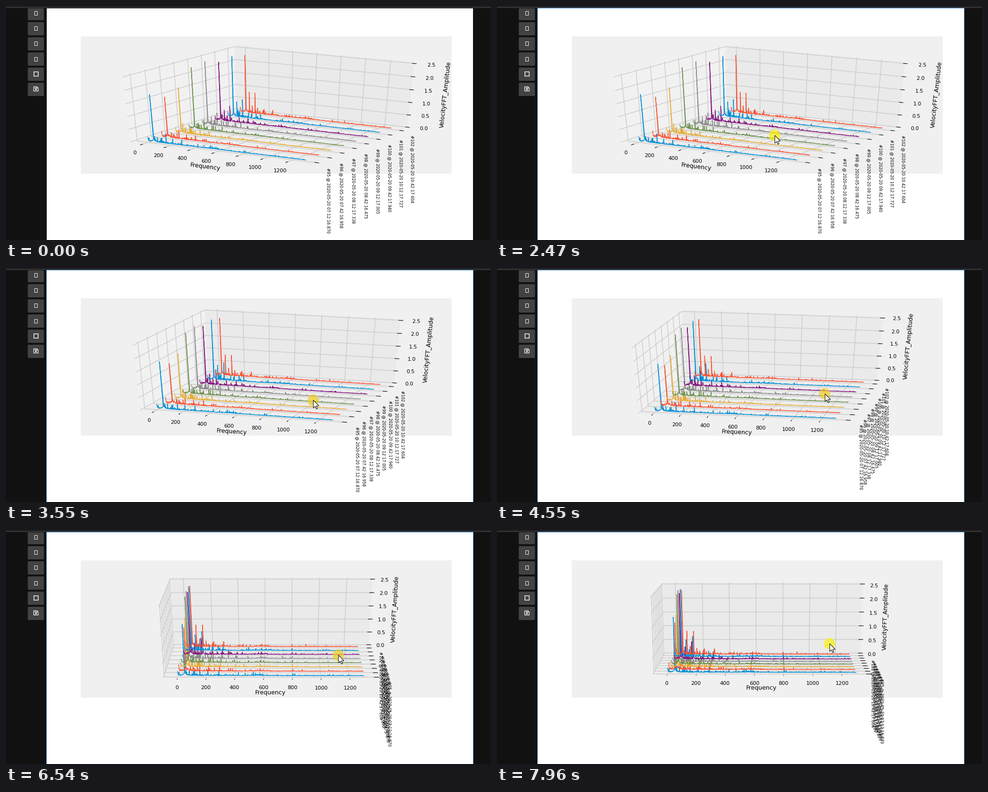
Recreate the animation shown at these times as a matplotlib script. Size 1024 by 494 pixels, loop 8000 ms.

```python
import numpy as np
import matplotlib.pyplot as plt
from matplotlib.animation import FuncAnimation
from matplotlib.collections import LineCollection
from matplotlib.patches import Circle, FancyBboxPatch, Polygon, Rectangle

W, H, DPI = 1024, 494, 100
LOOP, STEP = 8000, 40

plt.rcParams["font.family"] = "DejaVu Sans"
fig = plt.figure(figsize=(W / DPI, H / DPI), dpi=DPI, facecolor="#111111")
ax = fig.add_axes([0, 0, 1, 1])
ax.set(xlim=(0, W), ylim=(H, 0))
ax.axis("off")


def pt(pixels):
    return pixels * 72 / DPI


def box(x0, y0, x1, y1, color, z=0.0):
    return ax.add_patch(Rectangle((x0, y0), x1 - x0, y1 - y0, fc=color, lw=0, zorder=z))


def outline(x0, y0, x1, y1, lw):
    ax.add_patch(Rectangle((x0, y0), x1 - x0, y1 - y0, fill=False, ec="#f4f4f4", lw=pt(lw), zorder=0.3))


# ---- page and toolbar ----
box(0, 0, W, 3, "#222222")
box(0, 3, W, 4, "#4a4a4a")
focus = box(85, 4, 987, H, "#3b8fd8")
box(86, 5, 986, H, "#ffffff", 0.05)
box(158, 64, 941, 354, "#f0f0f0", 0.1)

for k in range(6):
    top = 2 + 32 * k
    cut = 3 if k == 0 else 0
    ax.add_patch(FancyBboxPatch((48, top + 2 + cut), 30, 24 - cut, fc="#424242", lw=0,
                                boxstyle="round,pad=2,rounding_size=2", zorder=0.2))
    if k < 4:
        outline(59.5, top + 9.5, 65.5, top + 17.5, 1)
outline(58.5, 138.5, 68, 147.5, 1.5)
ax.add_patch(Polygon([(58.5, 170.5), (65.5, 170.5), (68, 173), (68, 179.5), (58.5, 179.5)],
                     fill=False, ec="#f4f4f4", lw=pt(1.3), zorder=0.3))
outline(60.5, 171.5, 64.5, 173.5, 1)
ax.add_patch(Circle((63.2, 176.6), 1.6, fc="#f4f4f4", lw=0, zorder=0.3))

# ---- spectra ----
PALETTE = ["#008fd5", "#fc4f30", "#e5ae38", "#6d904f", "#8b8b8b", "#810f7c"]
SECONDS = [16.870, 16.958, 17.338, 16.475, 17.005, 17.940, 17.727, 17.604]
MAIN_PEAK = [1.84, 1.59, 1.79, 2.40, 2.48, 2.32, 2.40, 2.30]
COUNT = len(SECONDS)
freq = np.arange(0, 1301, 2.0)


def label(k):
    hour, minute = divmod(7 * 60 + 12 + 30 * k, 60)
    return f"#{95 + k} @ 2020-05-20 {hour:02}:{minute:02}:{SECONDS[k]:.3f}"


def spectrum(k):
    rng = np.random.default_rng(40 + k)
    amp = rng.exponential(0.006 + 0.014 * np.exp(-freq / 300))
    amp += 0.13 * np.exp(-freq / 3) + 0.10 / (1 + ((freq - 50) / 9) ** 2)
    amp += rng.exponential(0.015, freq.size) * np.exp(-((freq - 580) / 70) ** 2)
    for f in 60 + rng.exponential(200, 34):
        if f < 1290:
            amp[int(f / 2)] += rng.exponential(0.07) * np.exp(-f / 600) + 0.02
    # harmonics grow from the first spectrum to the last
    s = k / (COUNT - 1)
    peaks = {50: MAIN_PEAK[k], 82: 0.2 + 0.65 * s ** 3, 107: 0.06 + 0.24 * s,
             133: 0.08 + 0.76 * s, 212: 0.2, 288: 0.2, 575: 0.1, 805: 0.08, 1060: 0.05}
    for f, a in peaks.items():
        amp[f // 2] = a
    return amp


# ---- 3D projection in unit-cube coordinates ----
def unit_x(f):
    return (np.asarray(f) + 65) / 1430


def unit_y(n):
    return (np.asarray(n) + 0.35) / 7.7


def project(p, az, el):
    a, e = np.radians([az, el])
    d = np.asarray(p, float) - 0.5
    u = np.array([-np.sin(a), np.cos(a), 0])
    v = np.array([-np.sin(e) * np.cos(a), -np.sin(e) * np.sin(a), np.cos(e)])
    depth = 10 - d @ np.cross(u, v)
    return np.stack([560.1 + 783 / 0.185 * (d @ u) / depth,
                     205.1 - 290 / 0.185 * (d @ v) / depth], axis=-1)


curves = []
for k in range(COUNT):
    pts = np.column_stack([unit_x(freq), np.full(freq.size, unit_y(k)), spectrum(k) / 2.5])
    line, = ax.plot([], [], color=PALETTE[k % len(PALETTE)], lw=1, zorder=2 + k * 0.01)
    curves.append((line, pts))

LO, HI = -1 / 48, 1 + 1 / 48
CORNER = np.array([LO, HI, LO])  # where the three panes meet
PAD_TICK, PAD_TITLE = 0.0595, 0.1294

panes = []
for i, shade in enumerate([0.95, 0.9, 0.925]):
    j, m = [q for q in range(3) if q != i]
    quad = np.full((4, 3), CORNER[i])
    quad[:, j] = [LO, HI, HI, LO]
    quad[:, m] = [LO, LO, HI, HI]
    patch = ax.add_patch(Polygon(np.zeros((4, 2)), fc=(shade,) * 3, alpha=0.5, lw=0, zorder=0.5))
    panes.append((patch, quad))


class Axis3:
    """One axis: edge line, grid, ticks, tick labels and title."""

    def __init__(self, i, edge, tick_dir, locs, names, title="", size=8, rot=0):
        z = 1 + i * 0.1
        self.ends = np.array([edge, edge], float)
        self.ends[:, i] = LO, HI
        self.edge, = ax.plot([], [], color="#f0f0f0", lw=3, zorder=z)
        self.grid = ax.add_collection(LineCollection([], colors="#cbcbcb", lw=1, zorder=z + 0.02))
        self.ticks = ax.add_collection(LineCollection([], colors="k", lw=0.8, zorder=z + 0.04))

        base = np.tile(CORNER, (len(locs), 1))
        base[:, i] = locs
        one, two = base.copy(), base.copy()
        for arr, j in ((one, (i + 1) % 3), (two, (i + 2) % 3)):
            arr[:, j] = LO + HI - CORNER[j]
        self.grid_pts = np.stack([one, base, two], axis=1)

        at = np.tile(np.array(edge, float), (len(locs), 1))
        at[:, i] = locs
        outward = np.zeros(3)
        outward[tick_dir] = np.sign(CORNER[tick_dir] - 0.5) / 12
        self.tick_pts = np.stack([at + 0.2 * outward, at - 0.1 * outward], axis=1)

        away = np.sign(np.array(edge) - 0.5)
        away[i] = 0
        self.name_pts = at + away * PAD_TICK
        self.names = [ax.text(0, 0, s, size=size, rotation=rot, ha="center", va="top", zorder=z + 0.05)
                      for s in names]
        self.title_pt = self.ends.mean(axis=0) + away * PAD_TITLE
        self.title = ax.text(0, 0, title, size=9, ha="center", va="center", zorder=z + 0.01)

    def pose(self, az, el):
        ends = project(self.ends, az, el)
        self.edge.set_data(*ends.T)
        self.grid.set_segments(project(self.grid_pts, az, el))
        self.ticks.set_segments(project(self.tick_pts, az, el))
        for text, p in zip(self.names, project(self.name_pts, az, el)):
            text.set_position(p)
        dx, dy = ends[1] - ends[0]
        angle = np.degrees(np.arctan2(-dy, dx)) % 180
        self.title.set_rotation(angle - 180 if angle > 90 else angle)
        self.title.set_position(project(self.title_pt, az, el))


hz = np.arange(0, 1201, 200)
levels = np.arange(0, 2.6, 0.5)
rows = range(COUNT)
axes3 = [Axis3(0, [0, LO, LO], 1, unit_x(hz), hz, "Frequency"),
         Axis3(1, [HI, 0, LO], 0, unit_y(rows), [label(k) for k in rows], size=6, rot=270),
         Axis3(2, [HI, HI, 0], 0, levels / 2.5, levels, "VelocityFFT_Amplitude")]

# ---- pointer ----
ARROW = np.array([(0, 0), (0, 16.5), (3.9, 12.9), (6.4, 18.8), (8.8, 17.8), (6.3, 12), (11.6, 12)])
halo = ax.add_patch(Circle((0, 0), 12, lw=0, alpha=0.68, zorder=5))
arrow = ax.add_patch(Polygon(ARROW, fc="white", ec="black", lw=pt(1), zorder=6))

# ---- motion: (time, value...) key points; the plot lags behind the dragging pointer ----
ENTER, PRESS = 660, 1990
POINTER = [(ENTER, 1013, 420), (1090, 539, 283), (1470, 571, 275), (PRESS, 571, 275),
           (2470, 587.5, 273), (3550, 648.5, 279), (4550, 694, 265), (5150, 701.5, 264),
           (6540, 701.5, 264), (7330, 702, 240)]
AZIMUTH = [(2940, -60), (3410, -64.3), (3550, -72.6), (4380, -79), (4780, -79),
           (5150, -87.9), (5470, -87.9), (5720, -89.7)]
ELEVATION = [(2940, 30), (3550, 31), (4780, 31), (5150, 23.7), (6610, 23.4), (7950, 13)]


def track(keys, t):
    times, *values = zip(*keys)
    return [np.interp(t, times, v) for v in values]


def refresh(t, period=80, phase=30):
    """Time of the last screen refresh."""
    return (t - phase) // period * period + phase


def draw(i):
    t = refresh((i + 1) * STEP - 1)
    view = track(AZIMUTH, t) + track(ELEVATION, t)
    for patch, quad in panes:
        patch.set_xy(project(quad, *view))
    for axis in axes3:
        axis.pose(*view)
    for line, pts in curves:
        line.set_data(*project(pts, *view).T)

    x, y = track(POINTER, t)
    arrow.set_visible(t >= ENTER)
    arrow.set_xy(ARROW + (x + 0.5, y))
    halo.set_center((x, y))
    halo.set_facecolor("#f0cf20" if 2730 <= t < 6610 else "#fff000")
    for item in (halo, focus):
        item.set_visible(t >= PRESS)
    return []


anim = FuncAnimation(fig, draw, frames=LOOP // STEP, interval=STEP, repeat=True, repeat_delay=0, blit=False)
plt.show()
```
